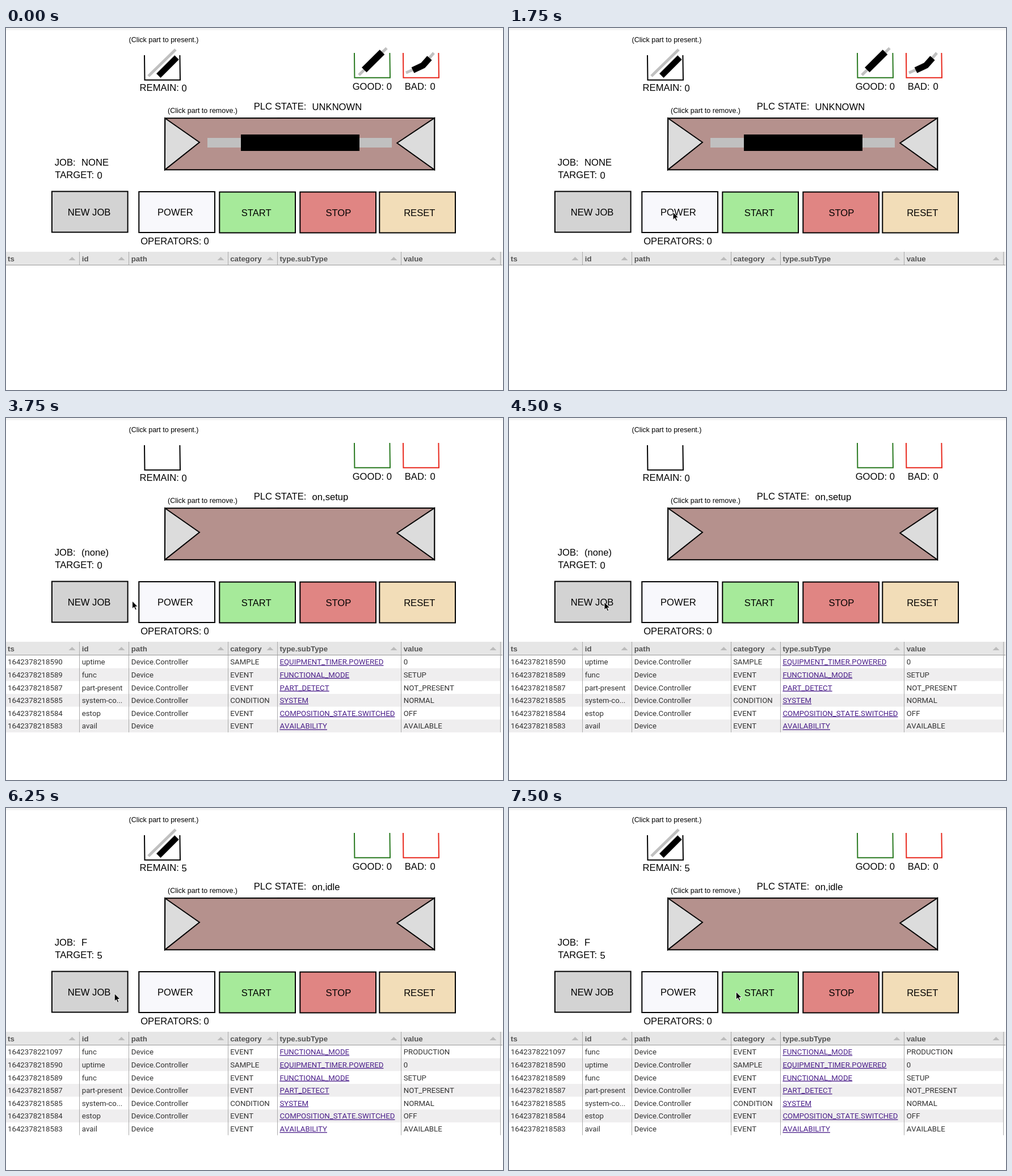
An HTML page that plays this animation: 876 by 639 pixels, repeating every 8 s.

```html
<!DOCTYPE html>
<html lang="en">
<head>
<meta charset="utf-8">
<title>Machine panel</title>
<style>
  html, body { margin: 0; width: 100%; height: 100%; overflow: hidden; background: #fff; }
  svg { display: block; width: 876px; height: 639px; }
  text { font: 16.6px "Liberation Sans", Arial, sans-serif; fill: #000; }
  .note { font-size: 12.5px; }
  .mid { text-anchor: middle; }
  .head { font-size: 13.3px; font-weight: bold; fill: #555; }
  .cell { font: 13.25px Roboto, sans-serif; font-kerning: none; fill: #333; }
  .link { fill: #4b1f8a; text-decoration: underline 1px; }
  .line { fill: none; stroke: #000; stroke-width: 2; }
  .box { stroke: #000; stroke-width: 2; }
  .rod { fill: none; stroke: #c0c0c0; stroke-width: 5; }
  .body { fill: none; stroke: #000; stroke-width: 12; }
</style>
</head>
<body>
<svg id="stage" viewBox="0 0 876 639">
  <rect width="876" height="4" fill="#f5f5f5"/>

  <text class="note" x="216.5" y="25">(Click part to present.)</text>
  <g id="remainPart">
    <path class="rod" d="M251 85L299 38"/>
    <path class="body" style="stroke-width:10.5" d="M268.8 84.2L301 52"/>
  </g>
  <path class="line" d="M244 48L244.5 91.7H307L306.4 48"/>

  <g id="doneParts">
    <path class="rod" d="M622 83L671 35.5"/>
    <path class="body" d="M631.3 74L663 42.4"/>
    <path class="rod" d="M705 79L735 66L754 44"/>
    <path class="body" style="stroke-width:11" d="M717 74.5L735 66L746.5 53"/>
  </g>
  <path class="line" style="stroke:#28791f" d="M614 44L614.4 87.8H677L676.4 44"/>
  <path class="line" style="stroke:#e8271c" d="M700 44L700.4 87.8H763L762.4 44"/>

  <text class="note" x="285.1" y="150.2">(Click part to remove.)</text>
  <path class="box" fill="#b5918d" d="M280.3 159.2L755.2 158.9V250.3H279.9Z"/>
  <path class="box" fill="#dcdcdc" d="M280.3 159.2L341 201.8L279.9 250.3Z"/>
  <path class="box" fill="#dcdcdc" d="M755.2 158.9L689.3 203L755.2 250.3Z"/>
  <g id="loadedPart">
    <rect x="355" y="194" width="325" height="17" fill="#c0c0c0"/>
    <rect x="414" y="188" width="209" height="29"/>
  </g>

  <g id="labels"></g>
  <g id="buttons"></g>
  <g id="header"></g>
  <g id="rows"></g>
  <path id="cursor" stroke="#fff" d="M.5 .5V14.3L3.7 11.3L6 16.4L8.3 15.4L6.1 10.5H10.4Z"/>
</svg>
<script>
const $ = id => document.getElementById(id);

function add(parent, tag, attrs, text = '') {
  const el = document.createElementNS('http://www.w3.org/2000/svg', tag);
  for (const key in attrs) el.setAttribute(key, attrs[key]);
  el.textContent = text;
  return parent.appendChild(el);
}

// Fixed labels, then the values that change
[['REMAIN:', 235.6, 111], ['GOOD:', 610.7, 109], ['BAD:', 702.8, 109],
 ['PLC STATE:', 436.8, 144.4], ['JOB:', 85.8, 243], ['TARGET:', 86.3, 265],
 ['OPERATORS:', 237.2, 382], ['0', 670.7, 109], ['0', 747.4, 109], ['0', 348.4, 382]
].forEach(([text, x, y]) => add($('labels'), 'text', { x, y }, text));

const field = (x, y) => add($('labels'), 'text', { x, y });
const fields = {
  remain: field(309.5, 111.5),
  plc: field(539.6, 144.8),
  job: field(133.1, 243.3),
  target: field(160.4, 265.8)
};

// Label, left, top, label centre, colour
[['NEW JOB', 80.9, 288.5, 146.6, '#d3d3d3'], ['POWER', 234.3, 289, 298.4, '#f8f8fc'],
 ['START', 376.3, 289.5, 441.2, '#a6ea9a'], ['STOP', 518.3, 289.5, 585.9, '#e08583'],
 ['RESET', 658.3, 289.5, 728.8, '#f2ddb8']
].forEach(([text, x, y, mid, fill]) => {
  add($('buttons'), 'rect', { class: 'box', x, y, width: 133.7, height: 72, fill });
  add($('buttons'), 'text', { class: 'mid', x: mid, y: y + 42.4 }, text);
});

// Table: title and left text edge, right border
const cols = [['ts', 3, 129.5], ['id', 133.7, 216.5], ['path', 220.7, 391.5],
  ['category', 395.2, 478.5], ['type.subType', 482.4, 696.5], ['value', 700.7, 871.5]];
const top0 = 419, rowH = 22.65;

add($('header'), 'rect', { y: 395, width: 875, height: 24, fill: '#e6e6e6' });
add($('header'), 'rect', { y: 418, width: 875, height: 1, fill: '#999' });
for (const [title, x, right] of cols) {
  add($('header'), 'text', { class: 'head', x, y: 412 }, title);
  add($('header'), 'path', { d: `M${right - 19} 410l6-6l6 6z`, fill: '#bbb' });
  add($('header'), 'path', { d: `M${right} 395V418`, stroke: '#aaa' });
}

const ctl = 'Device.Controller';
const log = [
  ['1642378221097', 'func', 'Device', 'EVENT', 'FUNCTIONAL_MODE', 'PRODUCTION'],
  ['1642378218590', 'uptime', ctl, 'SAMPLE', 'EQUIPMENT_TIMER.POWERED', '0'],
  ['1642378218589', 'func', 'Device', 'EVENT', 'FUNCTIONAL_MODE', 'SETUP'],
  ['1642378218587', 'part-present', ctl, 'EVENT', 'PART_DETECT', 'NOT_PRESENT'],
  ['1642378218585', 'system-co...', ctl, 'CONDITION', 'SYSTEM', 'NORMAL'],
  ['1642378218584', 'estop', ctl, 'EVENT', 'COMPOSITION_STATE.SWITCHED', 'OFF'],
  ['1642378218583', 'avail', 'Device', 'EVENT', 'AVAILABILITY', 'AVAILABLE']
];

function drawRows(count) {
  const box = $('rows');
  box.textContent = '';
  if (!count) return;
  log.slice(-count).forEach((row, r) => {
    const y = top0 + r * rowH;
    if (r % 2) add(box, 'rect', { y, width: 872, height: rowH, fill: '#efeeef' });
    row.forEach((text, c) => add(box, 'text',
      { class: c === 4 ? 'cell link' : 'cell', x: cols[c][1], y: y + 16.2 }, text));
  });
  for (const col of cols) {
    add(box, 'path', { d: `M${col[2]} ${top0}v${count * rowH}`, stroke: '#aaa' });
  }
}

const states = [
  { at: 0, remain: 0, plc: 'UNKNOWN', job: 'NONE', target: 0, rows: 0, parts: [1, 1, 1] },
  { at: 2250, remain: 0, plc: 'on,setup', job: '(none)', target: 0, rows: 6, parts: [0, 0, 0] },
  { at: 4750, remain: 5, plc: 'on,idle', job: 'F', target: 5, rows: 7, parts: [1, 0, 0] }
];
// Pointer jumps: time, x, y
const moves = [[0, -50, -50], [250, 446, 164], [500, 329, 293], [750, 320, 302],
  [1000, 301, 326], [1750, 288.5, 324.3], [3750, 222, 322.5], [4000, 186, 323],
  [4250, 169, 324], [4500, 167.5, 324.5], [6250, 190.7, 327], [6500, 285, 335],
  [6750, 345, 330.5], [7000, 371, 328], [7250, 399.7, 324]];

let shown;
function setState(s) {
  if (s === shown) return;
  shown = s;
  for (const key in fields) fields[key].textContent = s[key];
  ['remainPart', 'doneParts', 'loadedPart'].forEach((id, i) => {
    $(id).style.display = s.parts[i] ? '' : 'none';
  });
  drawRows(s.rows);
}

const start = performance.now();
function tick() {
  const t = (performance.now() - start) % 8000;
  setState(states.findLast(s => s.at <= t));
  const [, x, y] = moves.findLast(m => m[0] <= t);
  $('cursor').setAttribute('transform', `translate(${x} ${y})`);
  requestAnimationFrame(tick);
}
tick();
</script>
</body>
</html>
```
